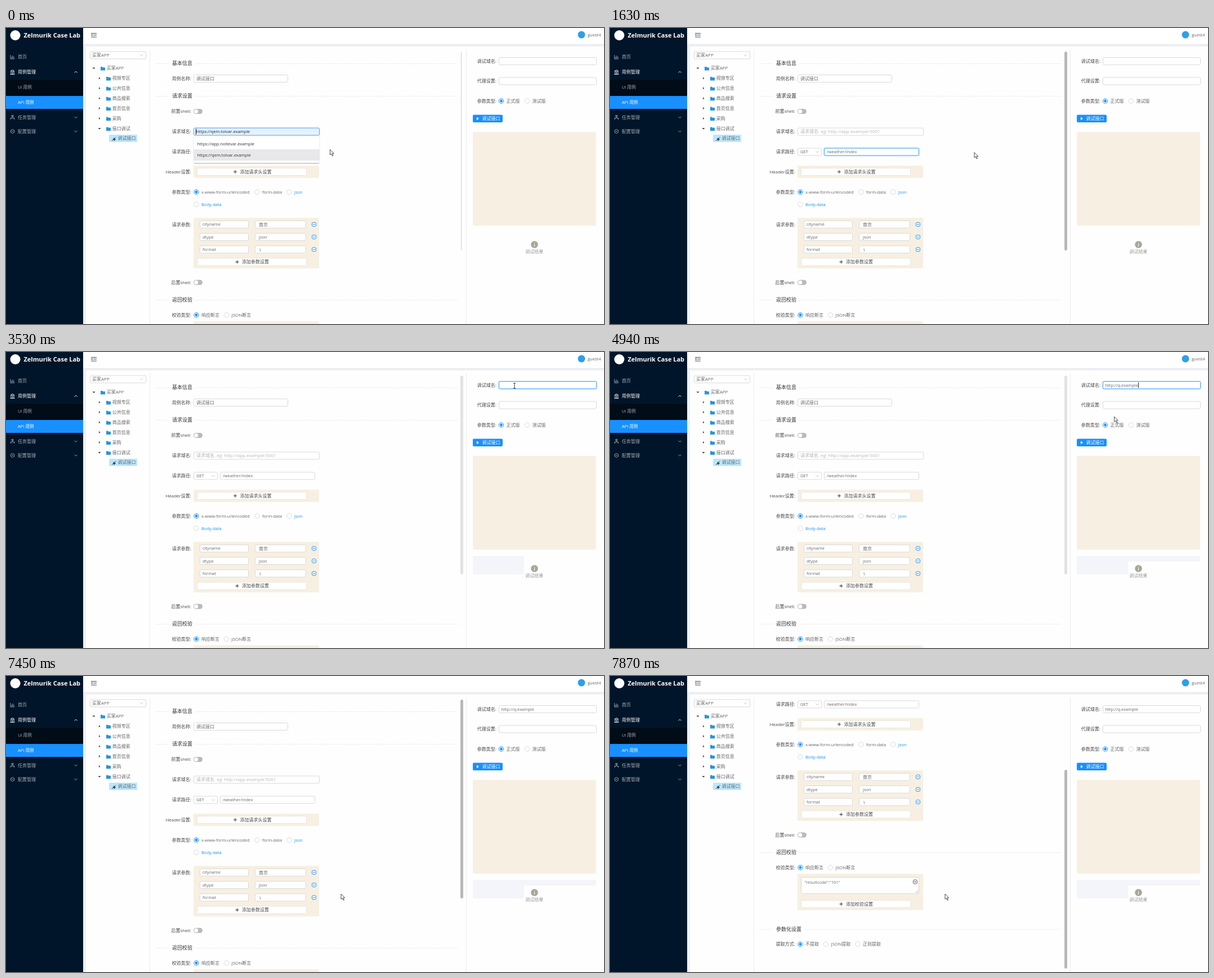
These frames come from a looping animation (1062 px wide and 527 px high, 8000 ms). An HTML page:

```html
<!DOCTYPE html>
<html lang="zh">
<head>
<meta charset="utf-8">
<style>
  html, body { margin: 0; width: 100%; height: 100%; overflow: hidden; background: #fff; }
  svg { display: block; width: 100vw; height: 100vh; }
  text { font-family: "Open Sans", "Noto Sans CJK SC", "Noto Sans CJK", sans-serif; white-space: pre; }
</style>
</head>
<body>
<svg id="stage" viewBox="0 0 1062 527"></svg>
<script>
const BLUE = '#1890ff', LINE = '#d9d9d9', BEIGE = '#f7f0e2', INK = '#4a4a4a', SOFT = '#666', MUTED = '#a6adb4';
const LOOP = 8000, ADDRESS = 'http://q.example';

// Drawing helpers; y of text is its vertical centre.
const text = (x, y, str, { fill = INK, size, anchor = 'start', weight = 400, id = '' } = {}) => {
  const px = size || (/[\u4e00-\u9fff]/.test(str) ? 8 : 7.5);
  return `<text id="${id}" x="${x}" y="${y + px * .37}" font-size="${px}" fill="${fill}" text-anchor="${anchor}" font-weight="${weight}">${str}</text>`;
};
const rect = (x, y, w, h, fill, r = 0, extra = '') =>
  `<rect x="${x}" y="${y}" width="${w}" height="${h}" rx="${r}" fill="${fill}" ${extra}/>`;
const frame = (x, y, w, h, stroke = LINE, fill = '#fff', extra = '') =>
  rect(x + .5, y + .5, w - 1, h - 1, fill, 2, `stroke="${stroke}" ${extra}`);
const path = (d, stroke, width = 1, fill = 'none') =>
  `<path d="${d}" stroke="${stroke}" stroke-width="${width}" fill="${fill}"/>`;
const circle = (x, y, r, fill, stroke = 'none') =>
  `<circle cx="${x}" cy="${y}" r="${r}" fill="${fill}" stroke="${stroke}"/>`;
const group = (id, body, extra = '') => `<g id="${id}" ${extra}>${body}</g>`;

const label = (y, str, right = 329) => text(right, y, str + ':', { anchor: 'end' });
const input = (x, y, w, str = '', fill = SOFT) => frame(x, y - 7, w, 14) + text(x + 5, y, str, { fill });
const focusRing = (x, y, w, h) =>
  frame(x - 1, y - 1, w + 2, h + 2, '#d5ebff', 'none') + frame(x, y, w, h, '#40a9ff', 'none');
const chevron = (x, y, color, dir = 1) => path(`M${x - 2.5} ${y - dir * 1.2}l2.5 ${dir * 2.5} 2.5 ${-dir * 2.5}`, color, .9);
const radio = (x, y, str, on, fill = SOFT) =>
  circle(x, y, 4.2, '#fff', on ? BLUE : LINE) + (on ? circle(x, y, 2.4, BLUE) : '') + text(x + 9, y, str, { fill });
const toggle = y => rect(333, y - 4.5, 16, 9, '#b9b9b9', 4.5) + circle(337.7, y, 3.6, '#fff');
const section = (y, str) =>
  path(`M266 ${y + .5}H290M${str.length * 9 + 300} ${y + .5}H802`, '#e9e9e9', 1).replace('/>', ' stroke-dasharray="2 1"/>') +
  text(295, y, str, { size: 9, fill: '#333' });
const addButton = (y, plusX, str) =>
  frame(339, y - 7, 195, 14, '#e2ded6', '#fff', 'stroke-dasharray="2 1"') +
  path(`M${plusX - 3} ${y}h6m-3 -3v6`, '#333') + text(plusX + 8.5, y, str);
const folder = (x, y) => path(`M${x} ${y - 3}h3l1 1.2h4v5.3h-8z`, 'none', 0, '#2795dc');

function sidebar() {
  const top = (y, str, icon, color, dir) =>
    path(icon, color, .9) + text(21, y, str, { fill: color, weight: color === '#fff' ? 500 : 400 }) + (dir ? chevron(124, y, color, dir) : '');
  return rect(0, 0, 137, 527, '#001529') + circle(16.5, 13, 9, '#fff') +
    text(31.5, 13, 'Zelmurik Case Lab', { fill: '#fff', size: 11, weight: 700 }) +
    rect(0, 92, 137, 54, '#000c17') + rect(0, 121, 137, 23, BLUE) +
    top(51.5, '首页', 'M8 48v7h7M10 54v-3m2 3v-5m2 5v-3', MUTED) +
    top(78.5, '用例管理', 'M8 77l3.5-2.5L15 77zM9 78v4m2.5-4v4m2.5-4v4M7.500 82.500h8', '#fff', -1) +
    text(21, 105.5, 'UI 用例', { fill: MUTED, size: 7.6 }) + text(21, 132.5, 'API 用例', { fill: '#fff', size: 7.6, weight: 500 }) +
    top(159, '任务管理', 'M10 155.500h3v2h-3zM11.500 158v2M8.500 162v-2h6v2M7.500 162h2m4 0h2', MUTED, 1) +
    top(184, '配置管理', 'M11.500 180.500l3 1.500v4l-3 1.500-3-1.500v-4zM10 184h3', MUTED, 1);
}

function header() {
  return rect(137, 0, 925, 527, '#eef0f5') + rect(137, 0, 925, 29, '#fff') +
    rect(137, 29, 925, 1, '#e2e5ea') + rect(142, 33, 920, 494, '#fefefe') +
    path('M151 9.500h10M155 12.500h6M151 16h10', '#444') + path('M151 12.500l2.500-1.700v3.400z', 'none', 0, '#444') +
    circle(1022, 12, 6.5, '#2e9fea') + text(1033, 12, 'guest4', { fill: SOFT }) +
    path('M255.500 38V527M817.500 38V527', '#ececec');
}

function tree() {
  const names = ['买家APP', '视频专区', '公共信息', '商品搜索', '首页信息', '采购', '接口调试'];
  const rows = names.map((name, i) => {
    const y = 71.5 + 17.9 * i, dx = i ? 10 : 0;
    const arrow = i % 6 ? `M${155 + dx} ${y - 2}l2.500 2-2.500 2z` : `M${153.5 + dx} ${y - 1}h5l-2.500 2.800z`;
    return path(arrow, 'none', 0, '#444') + folder(168 + dx, y + .5) + text(178.7 + dx, y, name, { fill: SOFT });
  });
  return frame(149, 41.5, 100, 14) + text(153, 48.5, '买家APP', { fill: SOFT }) + chevron(240.5, 48.5, '#bbb') + rows.join('') +
    rect(183, 190, 50, 13, '#bae7ff', 1) +
    path('M188 201l2-2M193.500 196l2-2M191 195.500l3.500 3.500', '#445', 1) +
    path('M190 198l2.300-2 2 2.300-2.300 2.200z', '#445', 1, '#445') + text(198.5, 196.5, '调试接口', { fill: SOFT });
}

function form() {
  const params = [['cityname', '南京'], ['dtype', 'json'], ['format', '1']].map(([key, value], i) => {
    const y = 349.7 + 22.3 * i;
    return input(344, y, 87, key) + input(442, y, 91, '') + text(449, y + .5, value, { fill: SOFT }) +
      frame(543, y - 4, 8, 8, BLUE) + path(`M545 ${y}h4`, BLUE);
  }).join('');
  return section(63, '基本信息') + label(90, '用例名称') + input(333, 90, 168, '调试接口') +
    section(121, '请求设置') + label(148.5, '前置shell') + toggle(148.5) +
    label(184.5, '请求域名') + input(333, 184.5, 224, '请求域名. eg: http://app.example:5001', '#b5b5b5') +
    label(220.5, '请求路径') + input(333, 220.5, 43, 'GET') + chevron(368, 220.5, '#bbb') +
    input(380, 220.5, 169, '/weather/index') + group('pathFocus', focusRing(380, 213.5, 169, 14)) +
    label(256, 'Header设置') + rect(333, 245, 223, 22, BEIGE, 2) + addButton(256, 407, '添加请求头设置') +
    label(292, '参数类型') + radio(338, 292, 'x-www-form-urlencoded', true) + radio(446, 292, 'form-data') +
    radio(503, 292, 'json', false, BLUE) + radio(338, 314, 'Body-data', false, BLUE) +
    label(350, '请求参数') + rect(333, 338, 223, 90, BEIGE, 2) + params + addButton(416.5, 410.5, '添加参数设置') +
    label(453, '后置shell') + toggle(453) + section(484, '返回校验') +
    label(511, '校验类型') + radio(338, 511, '响应断言', true) + radio(391.5, 511, 'JSON断言') +
    rect(333, 522, 223, 65, BEIGE, 2) + frame(339, 528, 210, 30) + text(345.5, 537, '"resultcode":"101"', { fill: SOFT }) +
    circle(542, 536.5, 3.8, '#fff', '#555') + path('M540 536.500h4', '#555') + path('M543 556l4-4M545.500 556l1.500-1.500', '#888', .7) +
    addButton(576, 410.5, '添加校验设置') + section(620.5, '参数化设置') +
    label(647.5, '提取方式') + radio(338, 647.5, '不提取', true) + radio(383.5, 647.5, 'JSON提取') + radio(440, 647.5, '正则提取') +
    group('dropdown',
      frame(333, 177.5, 224, 14, '#40a9ff', '#e8f1fb') + text(338, 184.5, 'https://qem.tolvar.example', { fill: '#222' }) +
      path('M337.500 179.500v10', '#000') +
      rect(333, 192, 224, 49, '#fff', 2, 'stroke="#ddd" stroke-width=".6"') + path('M334 241H556', '#aaa') +
      rect(333, 216, 224, 20, '#e8e8ea') +
      text(339.5, 206, 'https://app.noltevar.example', { fill: '#333' }) +
      text(339.5, 226, 'https://qem.tolvar.example', { fill: '#333' }));
}

function debugPanel() {
  return label(59, '调试域名', 871) + input(875, 59, 174) + group('addressFocus', focusRing(875, 52, 174, 14)) +
    text(879.5, 59, '', { id: 'address', fill: SOFT }) + group('caret', path('M0 54v10', '#222')) +
    label(94.5, '代理设置', 871) + input(875, 94.5, 174) +
    label(130, '参数类型', 871) + radio(879.5, 130, '正式版', true) + radio(925.5, 130, '测试版') +
    rect(829, 154.5, 53, 13.5, BLUE, 2) + path('M836 158.500l4 2.800-4 2.800z', 'none', 0, '#fff') +
    text(845.5, 161.3, '调试接口', { fill: '#fff', weight: 500 }) +
    rect(829, 185, 219, 167, BEIGE, 3) +
    group('result', rect(829, 363, 91, 33, '#f4f5fa', 2)) + group('resultStrip', rect(919, 363, 129, 10, '#f4f5fa')) +
    circle(938.5, 385.5, 6.3, '#a9a699') + path('M938.500 382v1.300m0 1.200v4.500', '#fff') +
    text(938.3, 398, '调试结果', { fill: '#999', anchor: 'middle' });
}

const stage = document.getElementById('stage');
stage.innerHTML = '<clipPath id="formClip"><rect x="256" y="38" width="561" height="489"/></clipPath>' +
  header() + sidebar() + tree() +
  group('formWindow', group('form', form()), 'clip-path="url(#formClip)"') +
  '<rect id="thumb" rx="2.5"/>' + debugPanel() +
  group('arrow', path('M0 0V9.300L2.200 7.400 4 11.300 5.500 10.600 3.900 6.900H6.700Z', '#222', .8, '#fff')) +
  group('beam', path('M-2 -4.500H2M0 -4.500V4.500M-2 4.500H2', '#222', .9));
const el = Object.fromEntries([...stage.querySelectorAll('[id]')].filter(n => n.id).map(n => [n.id, n]));

// Start, end, number of steps, then the cursor's waypoints.
const moves = [
  [120, 1080, 8, [575.5, 216.5], [484, 219]],
  [1230, 2170, 8, [484, 219], [647, 221.5], [905, 172]],
  [2290, 3250, 8, [905, 172], [903, 60]],
  [3530, 3680, 2, [903, 60], [903, 60], [895, 105]],
  [3960, 4940, 8, [895, 105], [820, 360], [895.5, 115]],
  [5090, 6090, 8, [895.5, 115], [898, 257]],
  [6240, 6360, 2, [898, 257], [860.5, 286.5]],
  [6640, 6910, 3, [860.5, 286.5], [595, 388]]
];

function progress(t, start, end, steps) {
  if (t < start) return 0;
  return Math.min(1, (Math.floor((t - start) / (end - start) * (steps - 1) + .12) + 1) / steps);
}

function cursorAt(t) {
  const [start, end, steps, ...points] = moves.filter(m => t >= m[0]).pop() || moves[0];
  const p = progress(t, start, end, steps) * (points.length - 1);
  const i = Math.min(Math.floor(p), points.length - 2);
  return points[i].map((v, axis) => v + (points[i + 1][axis] - v) * (p - i));
}

const show = (node, on) => node.setAttribute('visibility', on ? 'visible' : 'hidden');
const within = (t, a, b) => t >= a && t < b;

function render(t) {
  const [x, y] = cursorAt(t);
  const overInput = x > 875 && x < 1048 && (within(y, 52, 66) || within(y, 88, 102)) ||
    x > 380 && x < 549 && within(y, 213, 228);
  for (const node of [el.arrow, el.beam]) node.setAttribute('transform', `translate(${x} ${y})`);
  show(el.arrow, !overInput);
  show(el.beam, overInput);

  show(el.dropdown, t < 394);
  show(el.pathFocus, within(t, 943, 1900));
  show(el.addressFocus, within(t, 2976, 5376));
  show(el.result, t >= 2036);
  show(el.resultStrip, t >= 4520);

  const typed = ADDRESS.slice(0, Math.round(ADDRESS.length * progress(t, 3960, 4940, 8)));
  el.address.textContent = typed;
  show(el.caret, typed && t < 5376);
  el.caret.setAttribute('transform', `translate(${880 + el.address.getComputedTextLength()} 0)`);

  const scroll = 170 * progress(t, 7590, 7870, 3);
  el.form.setAttribute('transform', `translate(0 ${-scroll})`);
  const idle = t < 257, hovered = within(t, 257, 1900) || t >= 6775;
  const thumb = { x: idle ? 808 : 807, y: 42 + scroll * 125 / 170, width: idle ? 1 : 5, height: 354,
    fill: hovered ? '#b8b8b8' : idle ? '#ccc' : '#e2e2e2' };
  for (const key in thumb) el.thumb.setAttribute(key, thumb[key]);
}

function tick(now) {
  render(now % LOOP);
  requestAnimationFrame(tick);
}
render(0);
requestAnimationFrame(tick);
</script>
</body>
</html>
```
